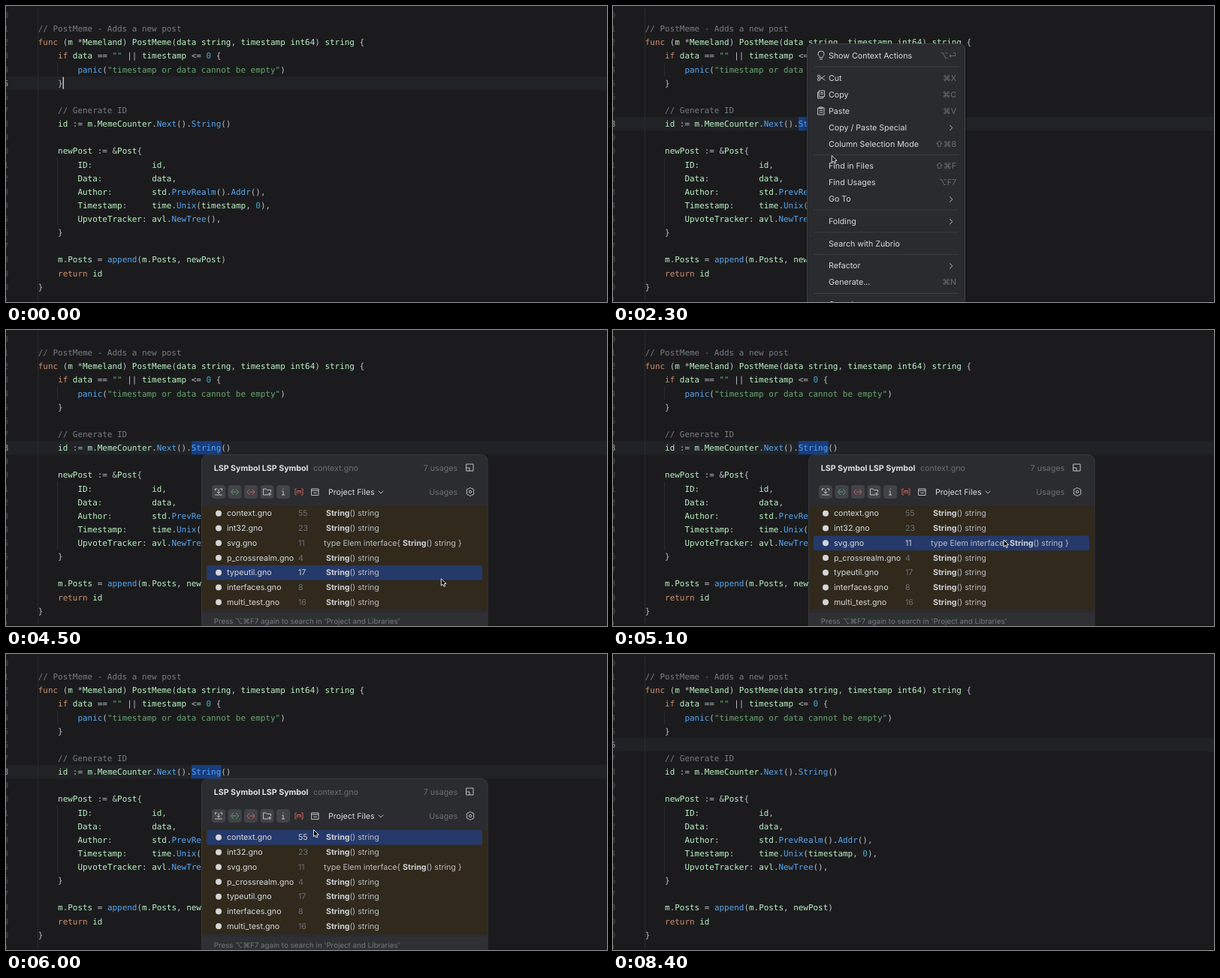
These frames come from a looping animation (800x395 px, 8500 ms). An HTML page:

```html
<!DOCTYPE html>
<html lang="en">
<head>
<meta charset="utf-8">
<title>Editor: show usages</title>
<style>
html, body { margin: 0; width: 100%; height: 100%; overflow: hidden; background: #1b1b1d; }
svg { display: block; width: 800px; height: 395px; }
text { white-space: pre; text-rendering: geometricPrecision; font: 10.65px Inter, "DejaVu Sans", sans-serif; }
.code { font: 10.93px "DejaVu Sans Mono", monospace; }
.bold { font-weight: 700; }
.small { font-size: 9.78px; }
.icon { fill: none; stroke: #bfc1c7; stroke-width: 1; stroke-linecap: round; stroke-linejoin: round; }
</style>
</head>
<body>
<svg id="stage" viewBox="0 0 800 395"></svg>
<script>
const stage = document.getElementById("stage");
const LOOP = 8500, CHAR = 6.58, LEFT = 42.8, PITCH = 18.13, ROW = 19.75;
const HOVER = "#25396a";
const baseline = line => 34.2 + PITCH * (line - 1);
const lineTop = line => baseline(line) - 13;

function add(parent, tag, attrs, content) {
  const node = document.createElementNS("http://www.w3.org/2000/svg", tag);
  for (const key in attrs) node.setAttribute(key, attrs[key]);
  if (content !== undefined) node.textContent = content;
  return parent.appendChild(node);
}
const group = parent => add(parent, "g", {});
const rect = (parent, x, y, width, height, fill, rx = 0, more = {}) =>
  add(parent, "rect", { x, y, width, height, fill, rx, ...more });
const label = (parent, x, middle, content, fill, more = {}) =>
  add(parent, "text", { x, y: middle + 3.6, fill, ...more }, content);
const icon = (parent, x, y, d, more = {}) =>
  add(parent, "path", { d, class: "icon", transform: `translate(${x} ${y})`, ...more });
const show = (node, visible) => node.setAttribute("visibility", visible ? "visible" : "hidden");

// Editor
const source = `
// PostMeme - Adds a new post
func (m *Memeland) PostMeme(data string, timestamp int64) string {
    if data == "" || timestamp <= 0 {
        panic("timestamp or data cannot be empty")
    }

    // Generate ID
    id := m.MemeCounter.Next().String()

    newPost := &Post{
        ID:            id,
        Data:          data,
        Author:        std.PrevRealm().Addr(),
        Timestamp:     time.Unix(timestamp, 0),
        UpvoteTracker: avl.NewTree(),
    }

    m.Posts = append(m.Posts, newPost)
    return id
}`.split("\n");

const syntax = [
  [/^\/\//, "#787b81"],
  [/^"/, "#67a570"],
  [/^(func|if|return)$/, "#cf8e6d"],
  [/^(panic|append|Next|String|PrevRealm|Addr|Unix|NewTree)$/, "#56a6f3"],
  [/^\d/, "#4ba6cc"],
  [/^\w/, "#b9f2c2"],
  [/./, "#bcbec4"]
];

const activeLine = rect(stage, 0, 0, 800, PITCH, "#212226");
for (const [column, from, to] of [[0, 0, 21], [4, 4, 4], [4, 11, 15]])
  rect(stage, Math.round(LEFT + column * CHAR) - 1, lineTop(from), 1, PITCH * (to - from + 1), "#2a2b2e");
const selection = rect(stage, 246.8, lineTop(8), 40, PITCH, "#193d7e");

const gutter = [];
for (let line = 0; line <= 21; line++)
  gutter.push(add(stage, "text", { x: 3.2, y: baseline(line), class: "code", "text-anchor": "end" }, line % 10));

source.forEach((text, line) => {
  for (const { 0: token, index } of text.matchAll(/\/\/.*|"[^"]*"|\w+|[^\w\s"]+/g)) {
    const fill = syntax.find(([pattern]) => pattern.test(token))[1];
    add(stage, "text", { x: LEFT + index * CHAR, y: baseline(line), fill, class: "code" }, token);
  }
});
const caret = rect(stage, 0, 0, 1.3, 16, "#d5d7dc");
rect(stage, 0, 393.5, 800, 2, "#1b121c");

// Context menu
const menu = group(stage);
rect(menu, 256, 50, 215, 360, "#000", 8, { opacity: 0.2 });
rect(menu, 258.5, 50.5, 210, 360, "#292b2e", 7, { stroke: "#3f4145" });
const menuHover = rect(menu, 265, 0, 197, 19.5, HOVER, 4);
const items = [
  [66, "Show Context Actions", "⌥⏎"], [96, "Cut", "⌘X"], [118, "Copy", "⌘C"], [140, "Paste", "⌘V"],
  [162, "Copy / Paste Special", ">"], [184, "Column Selection Mode", "⇧⌘8"],
  [213.3, "Find in Files", "⇧⌘F"], [235.5, "Find Usages", "⌥F7"], [257.5, "Go To", ">"],
  [287.2, "Folding", ">"], [317, "Search with Zubrio"], [346.5, "Refactor", ">"],
  [368.5, "Generate...", "⌘N"], [398.5, "Open In", ">"]
];
for (const [y, name, hint] of items) {
  label(menu, 287, y, name, "#d9dbe0");
  if (hint === ">") icon(menu, 450, y + 0.5, "M-1.5 -3.2L1.8 0L-1.5 3.2");
  else if (hint) label(menu, 457, y, hint, "#6d7077", { "text-anchor": "end" });
}
for (const y of [81, 198.7, 272.4, 302, 331.6, 383.5]) rect(menu, 267, y - 0.5, 193, 1, "#3c3e42");
icon(menu, 277, 66, "M-2 2.5C-2 1-4 0-4 -2A4 4 0 0 1 4 -2C4 0 2 1 2 2.5ZM-1.5 5H1.5");
icon(menu, 277, 96, "M-1.5 -1.5L5 3M-1.5 1.5L5 -3M-1.5 -2.3A1.6 1.6 0 1 0 -4.7 -2.3A1.6 1.6 0 1 0 -1.5 -2.3M-1.5 2.3A1.6 1.6 0 1 0 -4.7 2.3A1.6 1.6 0 1 0 -1.5 2.3");
icon(menu, 277, 118, "M-2.5 -5H4.5V3H-2.5ZM-2.5 -3H-4.5V5H2.5V3M-.5 -2.5H2.5M-.5 -.5H2.5");
icon(menu, 277, 140, "M-4 -4H4V5H-4ZM-2 -5H2V-3H-2ZM-2 -.5H2M-2 2H2");

// Usages popup
const popup = group(stage);
rect(popup, 260.5, 166.5, 380.5, 250, "#2a2c2f", 8, { stroke: "#37393d" });
label(popup, 276.7, 184, "LSP Symbol LSP Symbol", "#dfe1e5", { class: "bold" });
label(popup, 409, 184, "context.gno", "#6d7077");
label(popup, 601, 184, "7 usages", "#6d7077", { "text-anchor": "end" });
icon(popup, 617.5, 183.5, "M-4.5 -4.5H4.5V4.5H-4.5ZM-4.5 .5H-.5V4.5");

const tools = [
  [283, "M-4.5 -4V-2M4.5 -4V-2M-4.5 4H4.5M0 -3V2M-2 0L0 2L2 0M-4.5 -4H-2M2 -4H4.5"],
  [304.5, "M-2 -3.5L-5 0L-2 3.5M-3 0H1.5M2 -3.5L5 0L2 3.5", "#62a36c"],
  [326, "M-2 -3.5L-5 0L-2 3.5M-1.5 0H4M2 -3.5L5 0L2 3.5", "#c9605c"],
  [347.5, "M1 4H-5V-4H-1.5L0 -2.5H5V0M3.5 1V5M1.5 3H5.5"],
  [369, "M-1 -1H0V4M-1.5 4H1.5M0 -4V-3.6"],
  [390, "M-3.5 -4H-5V4H-3.5M3.5 -4H5V4H3.5M-2.5 2V-1.5H2.5V2M0 -1.5V2", "#c9605c"],
  [411.5, "M-4.5 -4H4.5V4.5H-4.5ZM-4.5 -1.8H4.5M-2 1.3H2"]
];
tools.forEach(([x, d, stroke = "#bfc1c7"], i) => {
  if (i < 5) rect(popup, x - 9, 207, 18, 18, "#414348", 4);
  icon(popup, x, 216, d, { style: `stroke:${stroke}` });
});
label(popup, 429, 216, "Project Files", "#d9dbe0", { "font-weight": 500 });
icon(popup, 499, 216.5, "M-3 -1.5L0 1.5L3 -1.5");
label(popup, 601, 216, "Usages", "#6d7077", { "text-anchor": "end" });
icon(popup, 618, 216, "M-2 -4.2L-1 -5.2H1L2 -4.2L4 -3.7L5 -2L4.2 0L5 2L4 3.7L2 4.2L1 5.2H-1L-2 4.2L-4 3.7L-5 2L-4.2 0L-5 -2L-4 -3.7ZM1.7 0A1.7 1.7 0 1 0 -1.7 0A1.7 1.7 0 1 0 1.7 0");

rect(popup, 261, 235, 379.5, 138.5, "#30291c");
const rowHover = rect(popup, 267, 0, 367, ROW, HOVER, 3);
const usages = [
  ["context.gno", 55], ["int32.gno", 23], ["svg.gno", 11], ["p_crossrealm.gno", 4],
  ["typeutil.gno", 17], ["interfaces.gno", 8], ["multi_test.gno", 16]
];
const rowNumbers = usages.map(([file, number], i) => {
  const y = 244.8 + i * ROW, inInterface = file === "svg.gno";
  add(popup, "circle", { cx: 283, cy: y, r: 4, fill: "#d4d5d7" });
  label(popup, 294, y, file, "#d9dbe0");
  const usage = label(popup, inInterface ? 423 : 426, y, "", "#bcbec4");
  if (inInterface) add(usage, "tspan", {}, "type Elem interface{ ");
  add(usage, "tspan", { class: "bold", fill: "#ced0d6" }, "String");
  add(usage, "tspan", {}, "() string" + (inInterface ? " }" : ""));
  return label(popup, 389, y, number, "#6d7077");
});
rect(popup, 261, 377.5, 379.5, 20, "#2e3033");
label(popup, 276.7, 388.5, "Press ⌥⌘F7 again to search in 'Project and Libraries'", "#75787e", { class: "small" });

// Mouse pointer: time, x, y
const pointer = add(stage, "path", {
  d: "M0 0V9.3L2.2 7.3L3.7 10.5L5.3 9.8L3.9 6.7H6.8Z",
  fill: "#000", stroke: "#fff", "stroke-width": 0.9, "stroke-linejoin": "round"
});
const path = [
  [1000, 300, 400], [1200, 259, 156.5], [2000, 259, 156.5], [2700, 341, 266], [3300, 341, 266],
  [3600, 560, 300], [4200, 600, 350], [5100, 520, 280], [5900, 409.5, 234.5]
];
function pointerAt(t) {
  const next = path.findIndex(key => key[0] > t);
  if (next < 1) return path.at(next).slice(1);
  const [t0, x0, y0] = path[next - 1], [t1, x1, y1] = path[next];
  const u = (t - t0) / (t1 - t0), ease = u * u * (3 - 2 * u);
  return [x0 + (x1 - x0) * ease, y0 + (y1 - y0) * ease];
}

function render(t) {
  const line = t < 1200 ? 5 : t < 7200 ? 8 : 6;
  const [x, y] = pointerAt(t);
  activeLine.setAttribute("y", lineTop(line));
  gutter.forEach((number, i) => number.setAttribute("fill", i === line ? "#a1a3ab" : "#4b5059"));
  show(selection, line === 8);
  caret.setAttribute("x", line === 5 ? 75.6 : 286.6);
  caret.setAttribute("y", lineTop(line) + 1);
  show(caret, t < 1700 && t % 1000 < 500);

  const menuOpen = t >= 1700 && t < 3500;
  show(menu, menuOpen);
  const hovered = items.find(item => Math.abs(item[0] - y) < 11);
  show(menuHover, menuOpen && x > 265 && hovered);
  if (hovered) menuHover.setAttribute("y", hovered[0] - 9.8);

  show(popup, t >= 3600 && t < 7200);
  const row = Math.max(0, Math.min(6, Math.floor((y - 235) / ROW)));
  rowHover.setAttribute("y", 235 + row * ROW);
  rowNumbers.forEach((number, i) => number.setAttribute("fill", i === row ? "#ced0d6" : "#6d7077"));

  show(pointer, t >= 1000 && t < 6500);
  pointer.setAttribute("transform", `translate(${x} ${y})`);
}

function tick() {
  const t = performance.now() % LOOP;
  render(Math.floor(t / 100) * 100);
  requestAnimationFrame(tick);
}
tick();
</script>
</body>
</html>
```
